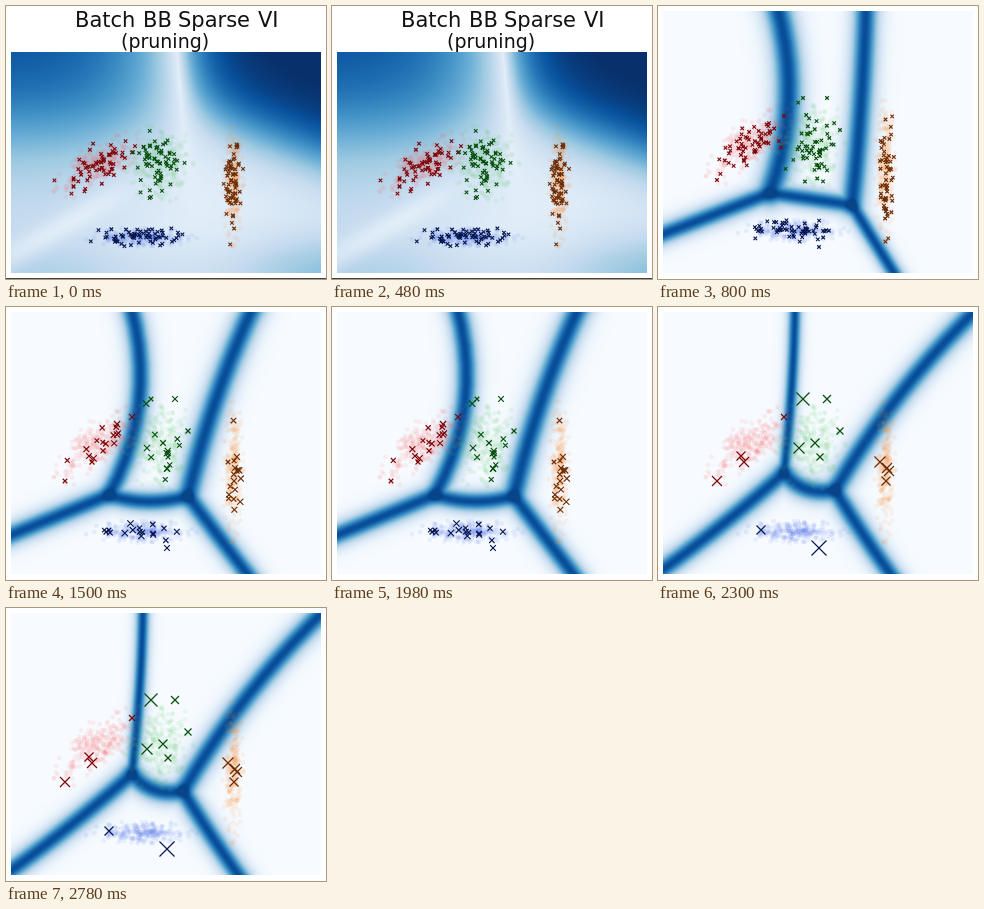
An HTML page with a canvas for the animation above (3100 ms loop, 320 by 273 pixels).

```html
<!DOCTYPE html>
<html lang="en">
<head>
<meta charset="utf-8">
<title>Sparse VI pruning</title>
<style>
html, body { margin: 0; width: 100%; height: 100%; overflow: hidden; background: #fff; }
canvas { display: block; width: 320px; height: 273px; }
</style>
</head>
<body>
<canvas id="stage" width="320" height="273"></canvas>
<script>
const W = 320, H = 273;
const LEFT = 5, RIGHT = 315, TOP = 5, BOTTOM = 267, TITLE_BOTTOM = 46;
const SQUASH = (BOTTOM - TITLE_BOTTOM) / (BOTTOM - TOP);
const BLUES = ['f7fbff', 'deebf7', 'c6dbef', '9ecae1', '6baed6', '4292c6', '2171b5', '08519c', '08306b']
  .map(hex => [0, 2, 4].map(i => parseInt(hex.slice(i, i + 2), 16)));

// Centre, spread and tilt of each class; survivors are the last marks left, as x, y, size.
const clusters = [
  { x: 91, y: 139, sx: 17, sy: 15, tilt: -0.65, dot: '#ff5a5a', mark: '#7d0508',
    survivors: [[59, 174, 10], [83, 149, 9], [86, 155, 10], [126, 110, 6]] },
  { x: 154, y: 137, sx: 14, sy: 18, tilt: 0, dot: '#5ccb64', mark: '#064d0b',
    survivors: [[145, 92, 13], [169, 92, 8], [182, 124, 7], [141, 141, 11], [157, 136, 9], [162, 150, 7]] },
  { x: 135, y: 224, sx: 22, sy: 4.5, tilt: 0, dot: '#4b70e6', mark: '#071650',
    survivors: [[103, 223, 9], [161, 241, 15]] },
  { x: 227, y: 163, sx: 4, sy: 28, tilt: 0, dot: '#ff913c', mark: '#6d2c05',
    survivors: [[222, 155, 11], [229, 161, 10], [231, 164, 10], [228, 174, 9]] }
];

// Two junctions a and b; every branch has an end, a sideways bow and a softness.
const boundaries = [
  { a: [112, 187], b: [194, 199], bridge: [0, 3.8],
    fromA: [[[119, 0], 15, 5.6], [[0, 230], 0, 4]],
    fromB: [[[208, 0], 2, 4.8], [[239, 272], 0, 3.4]] },
  { a: [103, 188], b: [182, 189], bridge: [6, 4],
    fromA: [[[125, 0], 19, 4.4], [[0, 230], 0, 4.2]],
    fromB: [[[247, 0], -5, 5], [[245, 272], 0, 4.2]] },
  { a: [126, 166], b: [177, 183], bridge: [8, 4.3],
    fromA: [[[137, 0], 2, 2.7], [[0, 266], -2, 4.2]],
    fromB: [[[321, 0], -8, 4.5], [[236, 272], 1, 4.1]] }
];

const clamp = (v, lo, hi) => Math.min(hi, Math.max(lo, v));
const sigmoid = v => 1 / (1 + Math.exp(-v));

// Entropy in bits of a two-way choice with log-odds z.
function entropy(z) {
  const p = sigmoid(-Math.min(z, 30));
  return -(p * Math.log2(p) + (1 - p) * Math.log2(1 - p || 1));
}

function makeRandom(seed) {
  return () => {
    seed = (Math.imul(seed, 1664525) + 1013904223) >>> 0;
    return seed / 4294967296;
  };
}

function sample({ x, y, sx, sy, tilt }, random) {
  const radius = Math.min(2.6, Math.sqrt(-2 * Math.log(1 - random())));
  const angle = random() * Math.PI * 2;
  const u = radius * Math.cos(angle), v = radius * Math.sin(angle);
  return [x + sx * u, y + sy * (tilt * u + Math.sqrt(1 - tilt * tilt) * v)];
}

function bowedPath([ax, ay], [bx, by], bow, steps = 10) {
  const dx = bx - ax, dy = by - ay, length = Math.hypot(dx, dy);
  return Array.from({ length: steps + 1 }, (_, i) => {
    const t = i / steps, offset = 4 * bow * t * (1 - t) / length;
    return [ax + dx * t - dy * offset, ay + dy * t + dx * offset];
  });
}

function pathDistance(x, y, path) {
  let best = Infinity;
  for (let i = 1; i < path.length; i++) {
    const [ax, ay] = path[i - 1], dx = path[i][0] - ax, dy = path[i][1] - ay;
    const t = clamp(((x - ax) * dx + (y - ay) * dy) / (dx * dx + dy * dy), 0, 1);
    const ex = x - ax - t * dx, ey = y - ay - t * dy;
    best = Math.min(best, ex * ex + ey * ey);
  }
  return Math.sqrt(best);
}

function bandField({ a, b, bridge, fromA, fromB }) {
  const branch = (from, [end, bow, softness]) => ({ path: bowedPath(from, end, bow), softness });
  const branches = [
    branch(a, [b, ...bridge]),
    ...fromA.map(spec => branch(a, spec)),
    ...fromB.map(spec => branch(b, spec))
  ];
  return (x, y) => {
    let sum = 0;
    for (const { path, softness } of branches) sum += entropy(pathDistance(x, y, path) / softness) ** 5;
    return 0.89 * Math.min(1.04, sum ** 0.2);
  };
}

function softField(x, y) {
  const ridge = 171 + (y - TITLE_BOTTOM) * 0.09;
  const away = scale => 1 - Math.exp(-Math.abs(x - ridge) / scale);
  const left = x < ridge ? 0.66 * away(36) * sigmoid((122 - y) / 28) : 0;
  const right = x > ridge ? 0.92 * away(22) * sigmoid((101 + (x - 180) * 0.37 - y) / 19) : 0;
  const corner = 0.28 * sigmoid((x - 260) / 28) * sigmoid((y - 230) / 15);
  const floor = 0.13 * sigmoid((105 - x) / 25) + 0.1 * sigmoid((y - 246) / 10);
  const ray = 0.13 * sigmoid((110 - x) / 15) * Math.exp(-(((y - 253 + 0.57 * x) / 15) ** 2));
  return 0.1 + left + right + corner + floor - ray;
}

function paintField(ctx, field, top) {
  const width = RIGHT - LEFT, height = BOTTOM - top;
  const image = ctx.createImageData(width, height);
  for (let y = 0, k = 0; y < height; y++) {
    for (let x = 0; x < width; x++, k += 4) {
      const level = clamp(field(x + LEFT + 0.5, y + top + 0.5), 0, 0.999) * 8;
      const i = Math.floor(level), t = level - i;
      for (let c = 0; c < 3; c++) image.data[k + c] = BLUES[i][c] + t * (BLUES[i + 1][c] - BLUES[i][c]);
      image.data[k + 3] = 255;
    }
  }
  ctx.putImageData(image, LEFT, top);
}

function drawDots(ctx, place) {
  const random = makeRandom(71);
  ctx.globalAlpha = 0.09;
  for (const cluster of clusters) {
    ctx.fillStyle = cluster.dot;
    for (let i = 0; i < 240; i++) {
      const [x, y] = sample(cluster, random);
      ctx.beginPath();
      ctx.arc(x, place(y), 2.4, 0, Math.PI * 2);
      ctx.fill();
    }
  }
  ctx.globalAlpha = 1;
}

function drawCross(ctx, x, y, size, color) {
  const r = size / 2;
  ctx.strokeStyle = color;
  ctx.beginPath();
  ctx.moveTo(x - r, y - r);
  ctx.lineTo(x + r, y + r);
  ctx.moveTo(x + r, y - r);
  ctx.lineTo(x - r, y + r);
  ctx.stroke();
}

// Pruning keeps the front of one list, so later marks are a subset of earlier ones.
function marksFor(stage, cluster, random) {
  const { survivors } = cluster;
  if (stage === 3) return survivors;
  const count = [66, 58, 18][stage];
  const kept = stage === 0 ? [] : survivors;
  return Array.from({ length: count }, (_, i) => {
    const [x, y] = kept[i] || sample(cluster, random);
    return [x, y, stage === 2 ? 4.5 + (i * 0.618 % 1) * 2 : 3.5];
  });
}

function drawTitle(ctx) {
  ctx.fillStyle = '#111';
  ctx.font = '21px "DejaVu Sans", sans-serif';
  [['Batch', 69], ['BB', 137], ['Sparse', 172], ['VI', 252]].forEach(([word, x]) => ctx.fillText(word, x, 21));
  ctx.font = '19px "DejaVu Sans", sans-serif';
  ctx.fillText('(pruning)', 115, 42);
  ctx.fillStyle = '#444';
  ctx.fillRect(0, H - 1, W, 1);
}

function buildScene(stage) {
  const canvas = document.createElement('canvas');
  canvas.width = W;
  canvas.height = H;
  const ctx = canvas.getContext('2d');
  const opening = stage === 0;
  const place = y => opening ? BOTTOM - (BOTTOM - y) * SQUASH : y;
  ctx.fillStyle = '#fff';
  ctx.fillRect(0, 0, W, H);
  paintField(ctx, opening ? softField : bandField(boundaries[stage - 1]), opening ? TITLE_BOTTOM : TOP);
  drawDots(ctx, place);
  ctx.lineWidth = 1.15;
  clusters.forEach((cluster, i) => {
    const random = makeRandom((opening ? 500 : 900) + i * 7919);
    for (const [x, y, size] of marksFor(stage, cluster, random)) drawCross(ctx, x, place(y), size, cluster.mark);
  });
  if (opening) drawTitle(ctx);
  return canvas;
}

const scenes = [0, 1, 2, 3].map(buildScene);
const ends = [800, 1500, 2300, 3100];
const stageCtx = document.getElementById('stage').getContext('2d');
const start = performance.now();

function render() {
  const time = (performance.now() - start) % 3100;
  stageCtx.drawImage(scenes[ends.findIndex(end => time < end)], 0, 0);
  requestAnimationFrame(render);
}
render();
</script>
</body>
</html>
```
